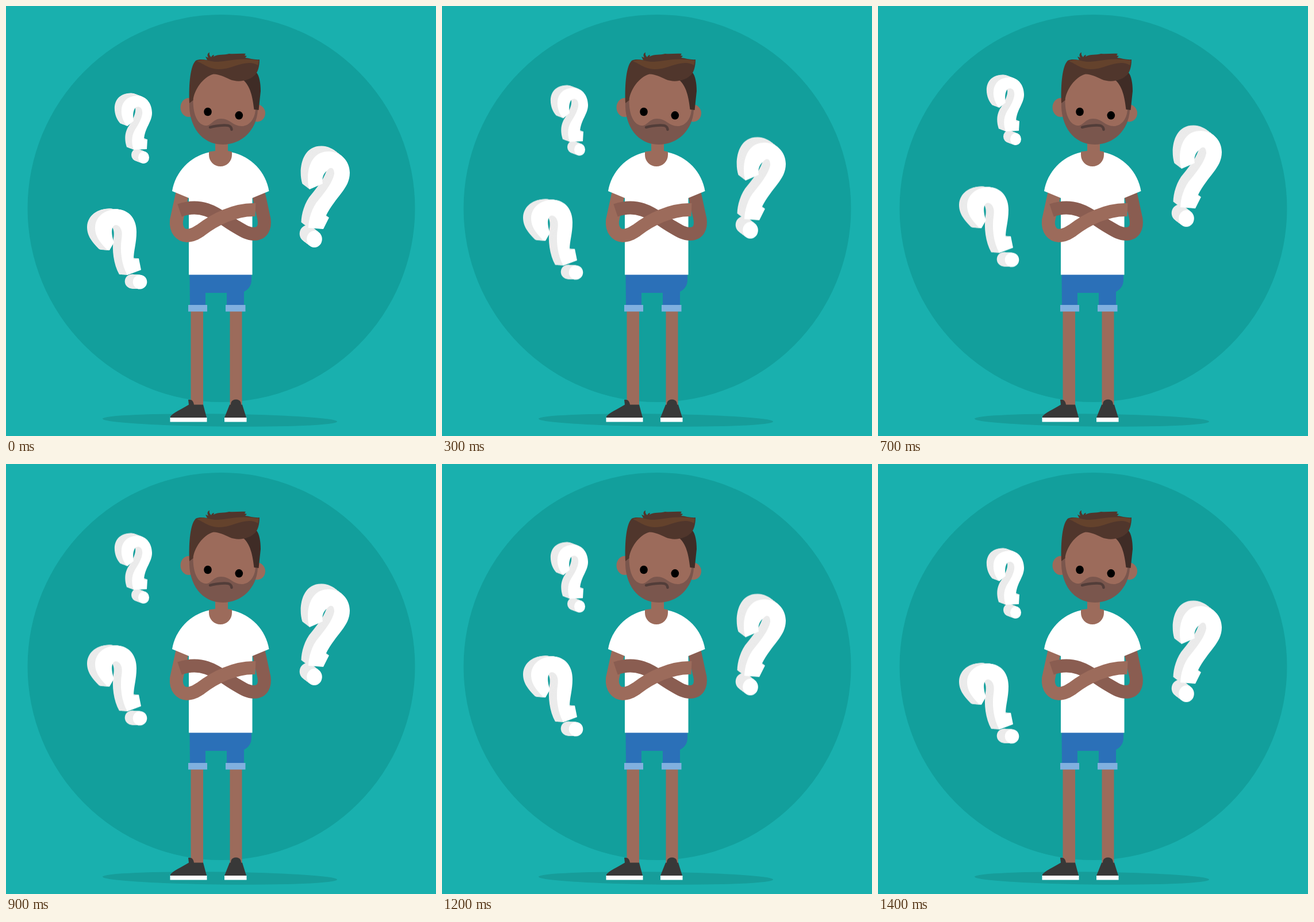
An HTML page for the animation above (1.5 s loop, 748x748 px).

```html
<!DOCTYPE html>
<html lang="en">
<head>
<meta charset="utf-8">
<title>Puzzled man</title>
<style>
  html, body { margin: 0; width: 100%; height: 100%; overflow: hidden; background: #19b0ae; }
  svg { display: block; width: 100%; height: 100%; }
  .skin { fill: #9c6b5b; }
  .hair { fill: #50362c; }
  .shoe { fill: #383838; }
  .arm { fill: none; stroke: #9c6b5b; stroke-width: 23; }
  .far { stroke: #8a5d51; }
  .white { fill: #fff; }
  .side { fill: #ebebeb; }
</style>
</head>
<body>
<svg viewBox="0 0 748 748">
  <rect width="748" height="748" fill="#19b0ae"/>
  <circle cx="374.5" cy="352" r="337" fill="#129f9c"/>
  <ellipse cx="372" cy="720.5" rx="204" ry="11" transform="rotate(.7 372 720.5)" fill="#169d9a"/>

  <g id="marks"></g>

  <!-- legs and shoes -->
  <path class="skin" d="M321.500 530H343V696H321.500ZM389.500 530H410.500V696H389.500Z"/>
  <path class="shoe" d="M286 716V714C290 708 306 701 318 693.500L317 685C323 684 326 687 327 693.500H343L349 716Z"/>
  <path class="shoe" d="M380 716L389 693.500H391C391 687 395 684.500 400 684.500S409 687 409 693.500H411L418 716Z"/>
  <path class="white" d="M285.500 716H349.500V723.500H285.500ZM380 716H418.500V723.500H380Z"/>

  <!-- shorts -->
  <path fill="#2b70b8" d="M319.500 466H427V476Q427 490 414 497V522H384V499H347V522H320Z"/>
  <path fill="#80b0df" d="M317 520H350V531.500H317ZM382 520H416.500V531.500H382Z"/>

  <!-- shirt and arms -->
  <path class="white" d="M318 325H428.500V467.500H318Z"/>
  <path class="arm" d="M307 325L296.500 373C295 390 304 399.500 315 399.500"/>
  <path class="arm far" d="M302 355.500C348 340 374 369 397 382C412 391 420 396.500 432 396.500C446 396 451 385 449 371L439 325"/>
  <path class="arm" d="M313 399.500C324 399.500 331 395 338 390.500C362 372 398 353 434 354.500"/>
  <path class="white" d="M353 254.500A83 83 0 0 0 289 322L318 334H428.500L457.500 322A83 83 0 0 0 393 254.500Z"/>
  <path class="skin" d="M353 253.500L364 252V236H386V252L393 253.500V259A20 20 0 0 1 353 259Z"/>

  <!-- head -->
  <ellipse class="skin" cx="318" cy="176.500" rx="14.500" ry="16.500"/>
  <ellipse class="skin" cx="437" cy="186.500" rx="14" ry="15"/>
  <path class="skin" d="M322 166C324 140 340 116 362 112L420 120C432 135 438 160 437 184C432 215 405 236 376 236C345 236 322 205 322 166Z"/>
  <path fill="#7a564d" d="M319 167L325.500 162C325 184 331 206 347 208C357 209 360 196 374 196C390 196 394 209 411 209C425 208 433 195 434 180L438 181C436 216 410 241 377 241C340 241 317 208 319 167Z"/>
  <path fill="#3f2c26" d="M416 126L435 115C441 121 443 135 443 148L439.500 181L431.500 180C429 158 425 139 412 128Z"/>
  <path class="hair" d="M319 169C318 145 319 106 330 95C336 92 343 93 350 94L347 88L352 90C349 85 351 82 354 80.500C353 85 355 87 357 89C358 86 360 85 362 85L361 88C370 83 380 86 388 83C398 84 407 82 417 83L415 86L419 87L416 90C424 91 433 94 441 93C441 106 438 114 434 119C424 130 404 134 389 127.500C379 123 372 119 361 118.500C343 123 327 146 325.500 164Z"/>
  <path fill="#64422c" d="M332 96C347 90 354 98 369 97C388 96 407 89 440 95L438 103C428 96 414 99 399 104C380 111 366 112 352 106C345 103 338 98 332 96Z"/>
  <ellipse cx="351" cy="184" rx="6.800" ry="7.300"/>
  <ellipse cx="405.300" cy="190.300" rx="6.800" ry="7.300"/>
  <path fill="none" stroke="#523d39" stroke-width="4.500" stroke-linecap="round" d="M355 211C362 209 371 208 379 207.500C388 207 392 209 392.500 215"/>
</svg>
<script>
const LOOP = 1500, PEAK = 800;

// face: glyph outline, dot: [cx, cy, rx, ry], depth: extrusion vector, rise: travel in px
const marks = [
  {
    face: 'M211 209C197 195 193 157 229 156C246 157 254 172 254 186C254 202 241 212 240 233L246 232L245 249L222 250C217 235 219 222 227 211C234 200 238 190 237 183C236 174 228 174 225 177C220 183 221 194 222 200Z',
    dot: [239.5, 263.5, 9.5, 10.5], depth: [-12, -4.5], rise: 36.5
  },
  {
    face: 'M176 424C160 408 155 398 155 385C156 364 175 353 194 353.500C215 355 227 371 227 393C227 413 222 425 222 441L231 439L235 459L211 468C201 450 198 425 201 405C204 390 198 381 191 381C182 382 183 398 188 411L180 425Z',
    dot: [233, 480, 12.3, 12.3], depth: [-14, -1], rise: 44
  },
  {
    face: 'M528 319C521 298 525 252 562 253C583 254 598 270 598 290C598 318 574 330 556 366L562 368L552 388L526 386C526 372 532 350 544 337C556 322 568 307 571 292C571 279 563 280 559 286C552 291 549 300 551 309Z',
    dot: [536.5, 405.5, 13.3, 14.5], depth: [-12.5, -9.5], rise: 41
  }
];

const shift = ([x, y], k, body) => `<g transform="translate(${x * k} ${y * k})">${body}</g>`;

function extrude(shape, depth, layers = 16) {
  let out = '<g class="side">';
  for (let i = layers; i > 0; i--) out += shift(depth, i / layers, shape);
  return out + `</g><g class="white">${shape}</g>`;
}

function drawMark({ face, dot: [cx, cy, rx, ry], depth }) {
  const dot = `<ellipse cx="${cx}" cy="${cy}" rx="${rx}" ry="${ry}"/>`;
  return `<g>${extrude(dot, depth)}${extrude(`<path d="${face}"/>`, depth)}</g>`;
}

const layer = document.getElementById('marks');
layer.innerHTML = marks.map(drawMark).join('');

// Float up in eight even steps, sink back in seven.
marks.forEach(({ rise }, i) => {
  layer.children[i].animate([
    { transform: 'translateY(0px)', easing: 'steps(8, end)' },
    { transform: `translateY(${-rise}px)`, offset: PEAK / LOOP, easing: 'steps(7, end)' },
    { transform: 'translateY(0px)' }
  ], { duration: LOOP, iterations: Infinity });
});
</script>
</body>
</html>
```
